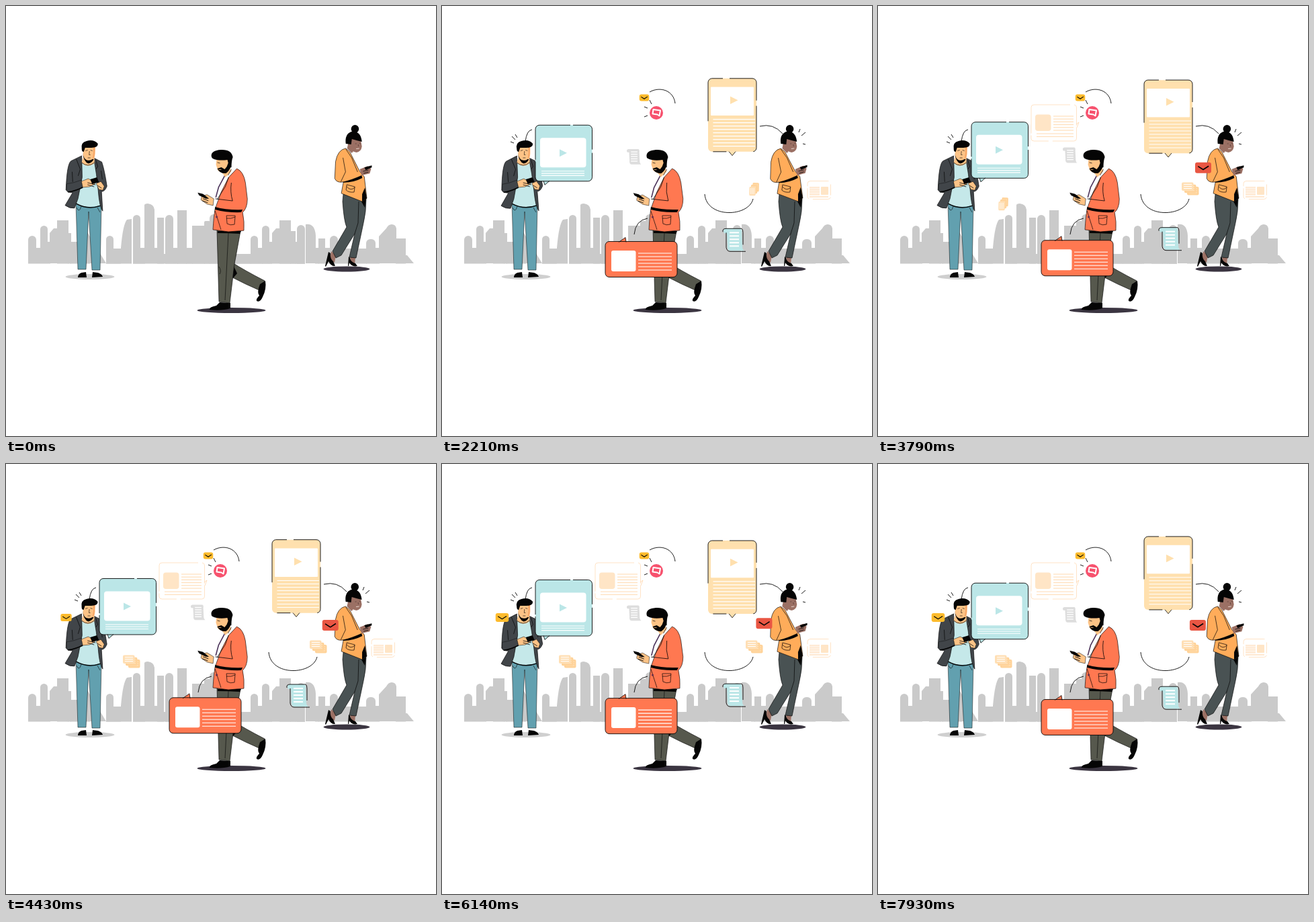
Write an HTML page with a canvas that moves like this. It is 640x640 px and loops after 8 s.

```html
<!DOCTYPE html>
<html lang="en">
<head>
<meta charset="utf-8">
<title>People with phones</title>
<style>
html, body { margin: 0; width: 100%; height: 100%; overflow: hidden; background: #fff; }
canvas { display: block; width: 640px; height: 640px; }
</style>
</head>
<body>
<canvas id="stage"></canvas>
<script>
const LOOP = 8000, TAU = Math.PI * 2;
const INK = '#050505', SKIN = '#fdc386', TEAL = '#bbe6e7', CREAM = '#ffe0ae';
const CORAL = '#ff7851', PEACH = '#ffe5c6', AMBER = '#ffac5a', GREY = '#cacaca';
const CLOTH = '#414549', KHAKI = '#56584d', SLATE = '#495253', BROWN = '#9b7064';
const canvas = document.getElementById('stage');
const ctx = canvas.getContext('2d');
const ratio = window.devicePixelRatio || 1;
canvas.width = canvas.height = 640 * ratio;

const clamp = v => Math.max(0, Math.min(1, v));
const span = (t, start, length) => clamp((t - start) / length);
const easeOut = u => 1 - (1 - u) ** 3;
const backOut = (u, s) => 1 + (s + 1) * (u - 1) ** 3 + s * (u - 1) ** 2;
const wave = (t, peak, period) => Math.cos(TAU * (t - peak) / period);

const paths = new Map();
function pathOf(d) {
  if (!paths.has(d)) paths.set(d, new Path2D(d));
  return paths.get(d);
}
function fill(d, color) {
  ctx.fillStyle = color;
  ctx.fill(pathOf(d));
}
function line(d, color = INK, width = 0.9) {
  ctx.strokeStyle = color;
  ctx.lineWidth = width;
  ctx.stroke(pathOf(d));
}
function shape(d, color, width = 0.65) {
  fill(d, color);
  line(d, INK, width);
}
function oval(x, y, rx, ry, color) {
  ctx.fillStyle = color;
  ctx.beginPath();
  ctx.ellipse(x, y, rx, ry, 0, 0, TAU);
  ctx.fill();
}
function box(x, y, w, h, r, color) {
  ctx.fillStyle = color;
  ctx.beginPath();
  ctx.roundRect(x, y, w, h, r);
  ctx.fill();
}
function dashedBox(x, y, w, h, r, color, width, dash) {
  ctx.strokeStyle = color;
  ctx.lineWidth = width;
  ctx.setLineDash(dash);
  ctx.beginPath();
  ctx.roundRect(x, y, w, h, r);
  ctx.stroke();
  ctx.setLineDash([]);
}
function rules(x0, x1, y, step, count, color, width = 1.1) {
  for (let i = 0; i < count; i++) line(`M${x0} ${y + i * step}H${x1}`, color, width);
}
function group(x, y, draw, scale = 1, angle = 0) {
  if (scale <= 0) return;
  ctx.save();
  ctx.translate(x, y);
  ctx.rotate(angle);
  ctx.scale(scale, scale);
  ctx.translate(-x, -y);
  draw();
  ctx.restore();
}
function pop(t, start, x, y, draw, length = 800, bounce = 2.6) {
  const u = span(t, start, length);
  if (u > 0) group(x, y, draw, backOut(u, bounce));
}
function shifted(dy, draw) {
  ctx.save();
  ctx.translate(0, dy);
  draw();
  ctx.restore();
}
// A curve that draws itself from its start
function grow(d, t, start, length, size) {
  const u = easeOut(span(t, start, length));
  if (!u) return;
  ctx.setLineDash([size * u, size * 2]);
  line(d);
  ctx.setLineDash([]);
}

// left, right, top, corner radius
const towers = [
  [33, 45, 342, 6], [45, 51, 360, 0], [51, 62, 327, 6], [62, 66, 351, 0], [76, 93, 319, 0],
  [92, 97, 338, 0], [96, 125, 351, 0], [149, 160, 342, 6], [160, 171, 361, 0], [189, 200, 311, 6],
  [200, 207, 360, 0], [225, 235, 315, 0], [237, 249, 311, 6], [249, 256, 360, 0],
  [255, 269, 304, 0], [268, 278, 360, 0], [277, 296, 327, 0], [295, 304, 320, 2], [303, 318, 310, 6],
  [317, 365, 370, 0], [364, 375, 342, 6], [375, 382, 360, 0], [381, 392, 327, 6], [391, 396, 351, 0],
  [407, 424, 319, 0], [423, 431, 335, 0], [430, 445, 351, 0], [433, 445, 326, 6], [460, 466, 360, 0],
  [465, 475, 346, 0], [475, 483, 360, 0], [482, 494, 342, 6], [494, 537, 361, 0], [536, 550, 347, 6],
  [550, 556, 360, 0], [580, 595, 346, 0]
];
function skyline() {
  for (const [a, b, top, r] of towers) box(a, top, b - a, 383.5 - top, [r, r, 0, 0], GREY);
  box(149, 369, 38, 14.5, 0, GREY);
  box(189, 369, 256, 14.5, 0, GREY);
  fill('M65 383V338L71 331H77V383Z M120 335L149 383H115Z M171 383V360Q174 325 180 318L187 317V383Z', GREY);
  fill('M206 383V296Q207 294 211 294Q220 295 221 303V383Z M396 383V338L402 331H408V383Z', GREY);
  fill('M446 383V325Q460 323 461 342V383Z M555 383V343L566 331Q569 325 574 325Q580 325 581 331V383Z', GREY);
  fill('M593 371H597L607 383H590Z M220 360H226V383H220Z', GREY);
}

function standingMan(sway) {
  oval(125, 403, 36.5, 4, '#cfcfcf');
  fill('M107 404Q107 399 112 397L119 396L120 404Z M128 404L129 396L137 397Q143 399 144 403Z', INK);
  fill('M104 290L107 392H119L123 306L128 393H140L142 292Z', '#62a0af');
  line('M104 294L107 392H119L123 306L128 393H140L142 296', INK, 0.5);
  line('M105 300Q109 309 112 298M136 300L140 307', INK, 0.6);
  group(123, 298, () => {
    fill('M111 232Q121 241 131 231L140 252L141 296Q123 303 104 294L108 250Z', '#c5e8e9');
    line('M104 294Q122 304 141 297', INK, 1.5);
    shape('M112 223L96 231Q90 236 89 274Q92 278 99 278L88 297Q95 302 102 301L107 287L113 255Z', CLOTH);
    shape('M130 226L142 232Q146 243 150 268Q147 276 142 276L144 305Q139 299 137 274L134 250Z', CLOTH);
    line('M104 228L110 243L107 253M133 229L136 239L133 243M98 247L99 262M141 245L143 258', INK, 0.7);
    shape('M90 265Q100 264 112 259L114 270L97 277Q91 279 90 274Z', CLOTH, 0.4);
    line('M92 277Q102 276 114 270', INK, 1.6);
    fill('M114 226H131V234Q121 242 112 233Z', SKIN);
    line('M112 233Q121 241 131 233', INK, 0.7);
    fill('M114 209L114 224Q118 234 124 234Q131 231 132 220V209Z', SKIN);
    fill('M129 209H132L131 224L128 229Q130 219 129 209Z', '#f7a767');
    fill('M113.5 219Q115 227 119 229Q124 231 128 228L130 228Q127 234 122 234.5Q115 232 113.5 219Z', INK);
    fill('M112 213Q110 203 119 201Q130 198 136 205Q136 211 126 211L117 211L115 217Q112 217 112 213Z', INK);
    line('M117.5 215.5L121 214.5M125 214.5L128 215.5M123.5 216L123 221.5L125 221.5M121 226L125 226', INK, 0.6);
    shape('M112 261L122 257L130 261L132 265L124 269L114 270Z', SKIN, 0.5);
    shape('M134 264L141 261L146 268L144 274L138 273Z', SKIN, 0.5);
    fill('M125 258L135 255L138 262L128 265Z', INK);
    line('M121 263L133 266M121 266L131 269M136 267L142 271', INK, 0.8);
  }, 1, sway);
}

function walkingMan(sway) {
  oval(335.5, 453, 51, 4, '#3b3541');
  shape('M337 382Q354 393 385 409L377 423Q356 414 337 404Z', KHAKI);
  fill('M337 383L344 398L338 405Z M378 414L386 409Q388 421 382 433Q378 442 373 439Q372 436 377 431Q373 427 378 414Z', INK);
  fill('M318 441L334 442V450Q321 454 303 452Q302 448 313 446Z', INK);
  shape('M314 333L317 440L333 442L340 384L349 335Z', KHAKI);
  line('M331 338L326 438M317 388Q321 394 318 399', INK, 0.6);
  fill('M315 335H350L348 339Q330 338 315 338Z', INK);
  group(330, 335, () => {
    fill('M325 249L342 242L334 254L318 287L310 289L316 270Z', '#fff');
    line('M326 251L316 270L312 285', '#4b335a', 1.6);
    shape('M343 242Q353 246 356 263L359 287Q359 301 352 307Q355 321 354 334L331 336L308 333Q309 314 311 302L320 277L331 255Z', CORAL);
    line('M331 255L326 269L314 288M335 263Q333 277 337 290M311 287L337 290', INK, 0.8);
    fill('M311 299Q329 304 352 303L350 307Q330 308 311 303Z', INK);
    line('M328 312L341 312L340 325Q334 327 329 324ZM328 316Q335 317 341 314M311 305L320 333', INK, 0.7);
    oval(313.5, 314, 1.7, 1.7, '#71334b');
    fill('M307 286L311 285L312 298L308 297Z', '#fff');
    shape('M291 283L299 281L309 287L308 297L299 295L290 289Z', SKIN, 0.5);
    line('M293 287L301 290M292 290L300 293', INK, 0.9);
    fill('M285 278L293 280L302 287L297 287L287 282Z', INK);
    fill('M313 227L312 236L315 245L324 250L332 246L335 226Z', SKIN);
    fill('M322 249L333 241L335 246L326 255Z', SKIN);
    fill('M314 242L320 240L325 243Q329 239 330 234L334 235Q335 243 327 249Q318 250 314 242Z', INK);
    fill('M305 223Q305 215 319 214Q335 213 337 225Q335 230 335 240L332 241L329 229Q315 231 307 227Q305 226 305 223Z', INK);
    line('M316 243.5H320', '#f7bb82', 0.8);
    line('M314 233L318 234M335 243L330 252', INK, 0.7);
  }, 1, sway);
}

function woman(sway) {
  oval(507, 391.5, 34.5, 4, '#3b3541');
  fill('M484 365L491 371L489 382L482 377Z M512 371L520 374L519 385L513 380Z', BROWN);
  fill('M480 366L483 368Q482 376 487 380L490 387Q484 388 480 380L476 388L475 387Z', INK);
  fill('M510 373L512 375Q513 381 520 383L523 387Q515 389 511 382L510 387H509Z', INK);
  shape('M502 280L501 291Q503 320 507 329L486 365L491 375L499 371L519 339L511 374L521 375L532 323Q536 307 536 287Z', SLATE);
  line('M525 291L524 323L519 339', INK, 0.7);
  fill('M528 288L536 286L534 300L529 291Z', INK);
  group(519, 288, () => {
    fill('M507 209L518 215L529 239L524 246L510 222Z', '#fff');
    shape('M505 212Q493 214 490 232L489 257Q492 264 502 262L499 279L530 291L537 286L533 254L526 246L511 217Z', AMBER);
    line('M505 213L514 226L523 247M501 226L505 247L498 262', INK, 0.7);
    fill('M501 262Q514 259 529 252L530 256Q517 263 502 263Z M530 280L534 270L537 286L530 291Z', INK);
    line('M507 266L519 269L518 277Q510 278 506 274ZM507 269Q513 276 519 270', INK, 0.7);
    fill('M526 243L538 238L543 242L541 249L529 252Z', BROWN);
    line('M531 246L539 244M532 249L539 247', INK, 0.8);
    fill('M533 240L544 237V240L535 244Z', INK);
    fill('M509 202L507 212L514 219L518 214Z', BROWN);
    fill('M510 197L527 199L529 209Q528 217 521 218Q512 216 510 208Z', BROWN);
    fill('M505 205Q503 191 513 187Q527 185 529 202L521 200L514 198L513 206Z', INK);
    oval(518.5, 183, 5.8, 6, INK);
    line('M519 205L521 205M525 204L527 205M523.5 206L524 209', '#452e2a', 0.6);
    line('M520.5 212.5L525 212', '#f2dfd8', 0.9);
  }, 1, sway);
}

function panel(x, y, w, h, color, tail, dash) {
  box(x, y, w, h, 6, color);
  fill(tail, color);
  dashedBox(x, y, w, h, 6, INK, 0.9, dash);
  line(tail, INK, 0.8);
}
function tealBubble() {
  panel(139, 173.5, 84.5, 83.5, TEAL, 'M151 256.5L153 262.5L160 256.5', [46, 4, 62, 5, 150, 3, 60, 0]);
  box(146, 192.5, 68.5, 44, 4, '#fff');
  fill('M175 209.5L186 215L175 220.5Z', TEAL);
  rules(148, 212, 242, 3.3, 3, '#fff');
}
function creamBubble() {
  panel(396, 111.2, 72, 109, CREAM, 'M427 220L432 226L437 220', [16, 10, 70, 8, 70, 40, 20, 50, 66, 0]);
  box(400, 124, 64, 42.5, 1, '#fff');
  fill('M429 138L440.5 143.7L429 149.5Z', CREAM);
  rules(403.5, 466, 172, 5, 9, '#fff');
}
function coralBubble() {
  panel(243, 349, 107, 53, CORAL, 'M263 350L273 343L274 350', []);
  box(252, 362.5, 36.5, 31, 3, '#fff');
  rules(292, 342, 366.5, 5, 6, '#fff');
}
function paperCard(x, y, w, h) {
  box(x, y, w, h, 4, '#fff');
  dashedBox(x, y, w, h, 4, '#ffdcb8', 0.8, [w * 0.8, 6, h * 0.6, 3]);
}
function newsCard() {
  paperCard(228, 147, 67.5, 54);
  box(234, 161.5, 23.5, 24.5, 4, PEACH);
  rules(261, 291, 164, 4.2, 6, '#ffdcb5');
  rules(236, 291, 190, 4.5, 2, '#ffdcb5');
  line('M295 176L299 173L296 181', '#ffd6ac', 0.8);
}
function sideCard() {
  paperCard(544, 260.5, 34.5, 27);
  box(564, 269, 11, 12, 1, PEACH);
  rules(547, 562, 270, 2.7, 5, '#ffd6ac');
  rules(547, 575, 284, 2, 1, '#ffd6ac');
}
function scroll(color) {
  fill('M0 4Q0 0 4 0H25Q28 1 27 7L28 27Q28 31 31 33H10Q5 32 6 25L5 7H1Z', color);
  rules(9, 23, 6, 5, 5, '#fff', 2);
}
function tealScroll() {
  scroll(TEAL);
  line('M-1 5Q-2 0 4 0H27Q29 1 29 6V24M4 6V28Q5 34 10 34H33', INK, 0.9);
}
function placed(x, y, scale, draw) {
  ctx.save();
  ctx.translate(x, y);
  ctx.scale(scale, scale);
  draw();
  ctx.restore();
}
function mail(x, y, w, h, color, stroke) {
  box(x - w / 2, y - h / 2, w, h, 3, color);
  line(`M${x - w * 0.32} ${y - h * 0.14}L${x} ${y + h * 0.17}L${x + w * 0.34} ${y - h * 0.16}`, INK, stroke);
}
function chat() {
  oval(319, 159, 10, 10, '#f7526e');
  line('M314.5 154L325 155.5L323.5 163.5L320.5 161.5L313.5 160.5Z', '#fff', 2);
}
function stack(x, y) {
  for (const i of [2, 1, 0]) {
    box(x - 13 + i * 4, y - 10 + i * 3.2, 17.5, 12.5, 2, i ? '#ffd39a' : '#ffdfb5');
    rules(x - 10 + i * 4, x + 2 + i * 4, y - 7 + i * 3.2, 3, 3, i ? '#ffe5c2' : '#fff', 1);
  }
}
function spinIn(t, start, x, y) {
  const p = easeOut(span(t, start, 700));
  group(x, y, () => stack(x, y), p, -(1 - p) * TAU);
}

function render(t) {
  ctx.setTransform(ratio, 0, 0, ratio, 0, 0);
  ctx.fillStyle = '#fff';
  ctx.fillRect(0, 0, 640, 640);
  ctx.lineJoin = 'round';

  const bob = wave(t, 2250, 5500), drift = wave(t, 2600, 5800);
  const sway = 0.009 * wave(t, 0, 4000);

  skyline();
  standingMan(sway);
  walkingMan(sway * 0.6);
  woman(sway);

  grow('M124 202Q126 185 134 184', t, 250, 500, 24);
  grow('M507 190Q493 174 473 179', t, 250, 500, 40);
  grow('M286 340Q288 319 306 316', t, 350, 500, 36);
  grow('M347 145C345 126 325 119 309 128', t, 500, 500, 52);
  grow('M463 287C457 314 394 317 391 280', t, 1500, 650, 110);

  for (const d of ['M107 204L102 202M109 199L104 194M112 196L109 191', 'M531 188L533 183M535 193L541 188M537 205L541 206'])
    grow(d, t, 400, 400, 8);
  grow('M306 163L301 165', t, 1050, 200, 6);
  grow('M306 152L301 150M312 146L309 140', t, 1300, 300, 8);

  shifted(3.8 * bob, () => pop(t, 100, 153, 262, tealBubble));
  shifted(-3.7 * drift, () => pop(t, 150, 432, 226, creamBubble));
  shifted(1.5 * bob, () => pop(t, 200, 273, 343, coralBubble));

  pop(t, 450, 319, 159, chat, 550);
  shifted(2 * bob, () => pop(t, 500, 287, 222, () => placed(275, 211, 0.69, () => scroll('#dddddd')), 600));
  shifted(2.5 * drift, () => pop(t, 550, 435, 346, () => placed(419, 329, 1, tealScroll), 650));
  pop(t, 700, 544, 274, sideCard, 800, 3);
  pop(t, 1110, 301, 136.5, () => mail(301, 136.5, 14.5, 10, '#fdbb2d', 1.1), 600);
  spinIn(t, 1950, 465, 272.5);
  pop(t, 2600, 299, 176, newsCard, 750, 1.5);

  const glide = (t - 3790) / 1000;
  const redX = 484 - 1.95 * glide, redY = 239 - 1.8 * wave(t, 6200, 5000);
  pop(t, 2850, redX, redY, () => mail(redX, redY, 24, 16, '#e95643', 1.6), 650);
  spinIn(t, 3530, 187, 294.5);
  pop(t, 4220, 89.5, 228.5, () => mail(89.5, 228.5, 19.5, 13, '#fdbb2d', 1.2), 700, 1.2);
}

function tick(now) {
  render(now % LOOP);
  requestAnimationFrame(tick);
}
render(0);
requestAnimationFrame(tick);
</script>
</body>
</html>
```
